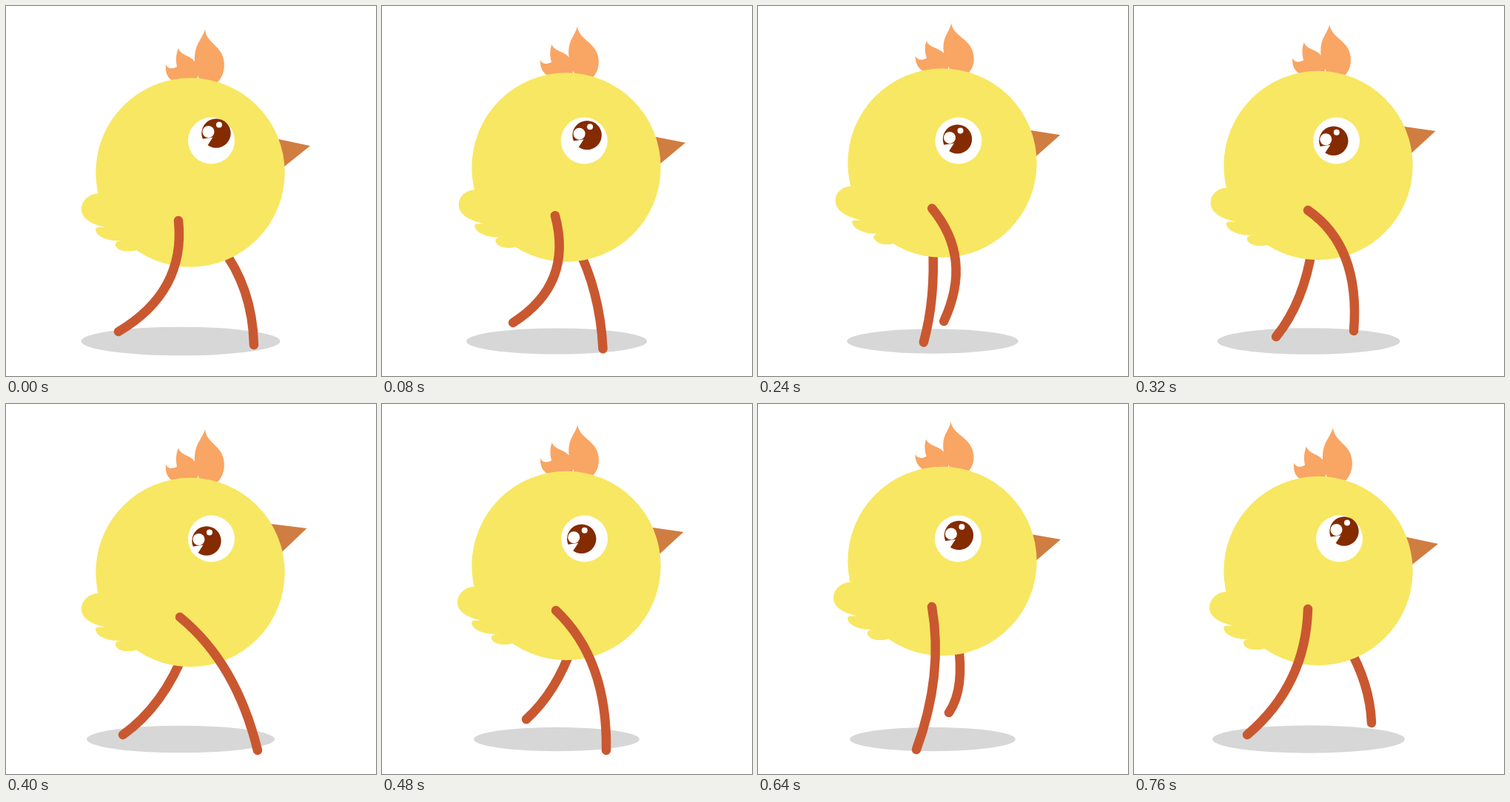
Recreate the animation shown at these times as an HTML page with a canvas. Size 500x500 px, loop 0.8 s.

```html
<!DOCTYPE html>
<html lang="en">
<head>
<meta charset="utf-8">
<title>Walking chick</title>
<style>
html, body { margin: 0; width: 100%; height: 100%; overflow: hidden; background: #fff; }
canvas { display: block; }
</style>
</head>
<body>
<canvas id="stage" width="500" height="500"></canvas>
<script>
const ctx = document.getElementById('stage').getContext('2d');
const LOOP = 800, STEP = 40;
const YELLOW = '#f8e762', ORANGE = '#f9a564', BEAK = '#d07d41', LEG = '#c95830', BROWN = '#842b00';

// Key times and the value of every moving part at each of them
const times = [0, 160, 320, 400, 480, 640, 760];
const tracks = {
  bodyY:  [225, 212.5, 215.5, 227.5, 218.5, 212.5, 225.5],
  sway:   [0, 1, .53, 0, .53, .95, 0],
  look:   [0, .42, .79, 1, .79, .42, 0],
  beakY:  [189, 180, 169, 168, 173, 183, 189],
  tail:   [0, 1, .5, 0, 0, 0, 0],
  shadow: [134.5, 112, 123.5, 127, 112, 112, 130]
};
// Legs as quadratic curves: hip, knee, foot
const frontLeg = [
  [233, 290, 243, 386, 152, 440],
  [235, 275, 274, 362, 209, 421],
  [235, 276, 306, 325, 297, 439],
  [235, 288, 311, 350, 340, 468],
  [235, 279, 305, 345, 303, 468],
  [235, 274, 251, 366, 214, 467],
  [235, 277, 232, 380, 153, 447]
];
const backLeg = [
  [290, 325, 333, 380, 335, 458],
  [238, 320, 256, 390, 257, 461],
  [241, 325, 230, 400, 192, 447],
  [243, 330, 213, 408, 158, 447],
  [258, 325, 235, 390, 195, 426],
  [270, 320, 280, 385, 258, 417],
  [288, 325, 319, 378, 321, 431]
];

const comb = new Path2D('M226 102C218 97 215 90 216 79C219 86 226 85 231 82C229 72 230 64 233 57' +
  'C236 67 248 66 255 75C254 50 266 45 269 31C270 46 283 51 290 62C298 75 296 93 286 103L262 103 259.5 94 257 103Z');
const tailFeathers = new Path2D('M130 253C112 252 102 263 102 275C102 288 118 296 135 299' +
  'C128 299 121 298 121 302C122 314 145 319 158 317C150 318 147 319 148 324C152 333 168 333 180 329L220 300 150 250Z');
const beak = new Path2D('M0 0L-60 -12.8 -50 40Z');
const glint = new Path2D('M-21 8L-4.5 5.5 -13 18.5 -20 16Z');

// Smooth cyclic interpolation through the key values
function sample(values, t) {
  const n = times.length;
  const timeAt = i => times[(i + n) % n] + Math.floor(i / n) * LOOP;
  const valueAt = i => values[(i + n) % n];
  const slope = i => (valueAt(i + 1) - valueAt(i - 1)) / (timeAt(i + 1) - timeAt(i - 1));
  const i = times.findLastIndex(key => key <= t);
  const span = timeAt(i + 1) - timeAt(i);
  const u = (t - timeAt(i)) / span, v = 1 - u;
  return valueAt(i) * v * v * (1 + 2 * u) + valueAt(i + 1) * u * u * (3 - 2 * u)
    + span * u * v * (slope(i) * v - slope(i + 1) * u);
}

function ellipse(x, y, rx, ry, color) {
  ctx.fillStyle = color;
  ctx.beginPath();
  ctx.ellipse(x, y, rx, ry, 0, 0, 2 * Math.PI);
  ctx.fill();
}

const circle = (x, y, r, color) => ellipse(x, y, r, r, color);

function shape(path, color, matrix) {
  ctx.save();
  ctx.transform(...matrix);
  ctx.fillStyle = color;
  ctx.fill(path);
  ctx.restore();
}

function leg(poses, t) {
  const [hx, hy, kx, ky, fx, fy] = poses[0].map((_, i) => sample(poses.map(p => p[i]), t));
  ctx.beginPath();
  ctx.moveTo(hx, hy);
  ctx.quadraticCurveTo(kx, ky, fx, fy);
  ctx.stroke();
}

function eye(x, y, look) {
  circle(x, y, 31.5, '#fff');
  const px = x + 6.5 - 13 * look, py = y - 10 + 13 * look;
  circle(px, py, 19.7, BROWN);
  shape(glint, '#fff', [1, 0, 0, 1, px, py]);
  circle(px - 10.5, py - 2, 8, '#fff');
  circle(px + 4, py - 11.5, 4, '#fff');
}

function draw(t) {
  const at = name => sample(tracks[name], t);
  const bodyY = at('bodyY'), lift = bodyY - 225;
  const sway = at('sway'), look = at('look'), tail = at('tail');
  const shadow = Math.max(112, at('shadow'));

  ctx.fillStyle = '#fff';
  ctx.fillRect(0, 0, 500, 500);
  ctx.strokeStyle = LEG;
  ctx.lineWidth = 12.5;
  ctx.lineCap = 'round';

  ellipse(236, 453, shadow, shadow * .144, '#d7d7d7');
  leg(backLeg, t);

  const lean = .11 * sway, squash = 1 - .08 * sway;
  shape(comb, ORANGE, [1, 0, lean, squash, -100 * lean - 1.5 * sway, 100 * (1 - squash) + lift]);

  const tilt = -.087 * look, c = Math.cos(tilt), s = Math.sin(tilt);
  shape(beak, BEAK, [c, s, -s, c, 411 - 4.5 * look, at('beakY')]);

  const skew = .138 * tail;
  shape(tailFeathers, YELLOW, [1, 0, skew, 1, -251 * skew, lift + 4 * tail]);
  circle(249, bodyY, 127.7, YELLOW);
  eye(277.5 - 7.5 * sway, 182, look);
  leg(frontLeg, t);
}

function tick() {
  draw(Math.floor(performance.now() % LOOP / STEP) * STEP);
  requestAnimationFrame(tick);
}
tick();
</script>
</body>
</html>
```
